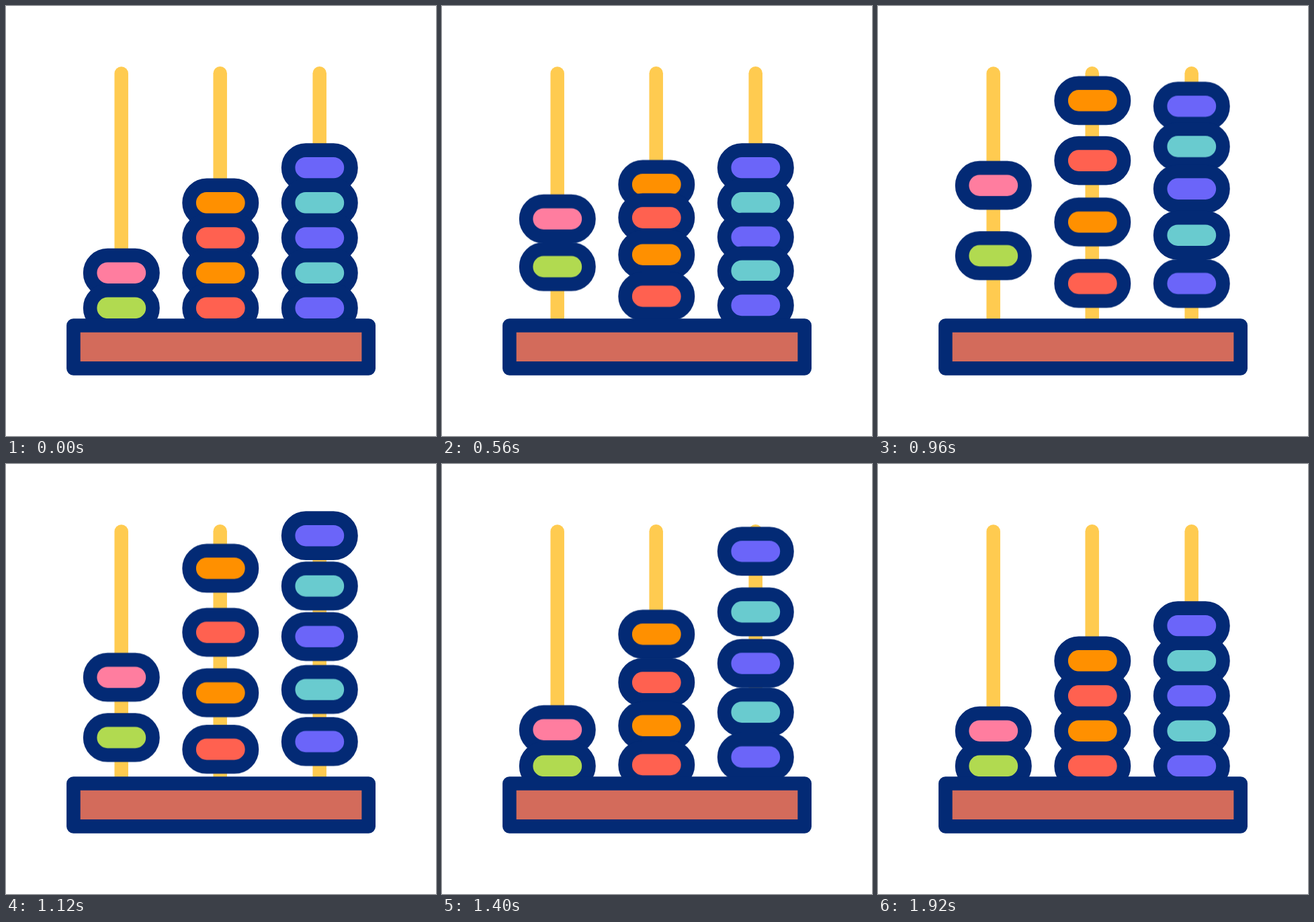
Write an HTML page that moves like this. It is 640x640 px and loops after 2 s.

```html
<!DOCTYPE html>
<html lang="en">
<head>
<meta charset="utf-8">
<title>Abacus</title>
<style>
  html, body { margin: 0; width: 100%; height: 100%; overflow: hidden; background: #fff; }
  svg { display: block; width: 100%; height: 100%; }

  .rods { stroke: #ffcb50; stroke-width: 20.5; stroke-linecap: round; }
  .outlined { stroke: #032a75; stroke-width: 20.6; stroke-linejoin: round; }

  .pink { fill: #ff7d9f; }
  .green { fill: #b1da50; }
  .orange { fill: #ff9000; }
  .red { fill: #ff6150; }
  .purple { fill: #6b65f9; }
  .teal { fill: #69cbcf; }

  /* Beads start 40 ms apart, the first one 200 ms into the loop. */
  .beads rect {
    width: 93.4px;
    height: 52.2px;
    rx: 26.1px;
    ry: 26.1px;
    animation: lift 2000ms cubic-bezier(.3333, 0, .6667, 1) infinite;
    animation-delay: calc(var(--order) * 40ms - 1800ms);
  }
  .beads .last { animation-name: lift-long; }

  @keyframes lift {
    0%, 60%, 100% { transform: translateY(0); }
    30% { transform: translateY(calc(var(--lift) * -1px)); }
  }
  @keyframes lift-long {
    0%, 63.75%, 100% { transform: translateY(0); }
    30% { transform: translateY(calc(var(--lift) * -1px)); }
  }
</style>
</head>
<body>
<svg viewBox="0 0 640 640">
  <g class="rods">
    <path d="M171.7 100.4V475"/>
    <path d="M318.7 100.2V475"/>
    <path d="M466.7 100.2V475"/>
  </g>

  <!-- Lower beads overlap the ones above them. -->
  <g class="beads outlined">
    <rect class="pink" x="125.1" y="371.1" style="--order:1; --lift:145.6"/>
    <rect class="green" x="125.1" y="423.3" style="--order:0; --lift:94.5"/>

    <rect class="orange" x="272.6" y="266.8" style="--order:5; --lift:154"/>
    <rect class="red" x="272.6" y="319" style="--order:4; --lift:115"/>
    <rect class="orange" x="272.6" y="371.1" style="--order:3; --lift:76.7"/>
    <rect class="red" x="272.6" y="423.3" style="--order:2; --lift:38.4"/>

    <rect class="purple last" x="420.1" y="214.6" style="--order:10; --lift:140.7"/>
    <rect class="teal" x="420.1" y="266.8" style="--order:9; --lift:112.7"/>
    <rect class="purple" x="420.1" y="319" style="--order:8; --lift:88.3"/>
    <rect class="teal" x="420.1" y="371.1" style="--order:7; --lift:62.4"/>
    <rect class="purple" x="420.1" y="423.3" style="--order:6; --lift:38.2"/>
  </g>

  <rect class="outlined" x="100.4" y="475.5" width="439.3" height="63.9" fill="#d36b5b"/>
</svg>
</body>
</html>
```
